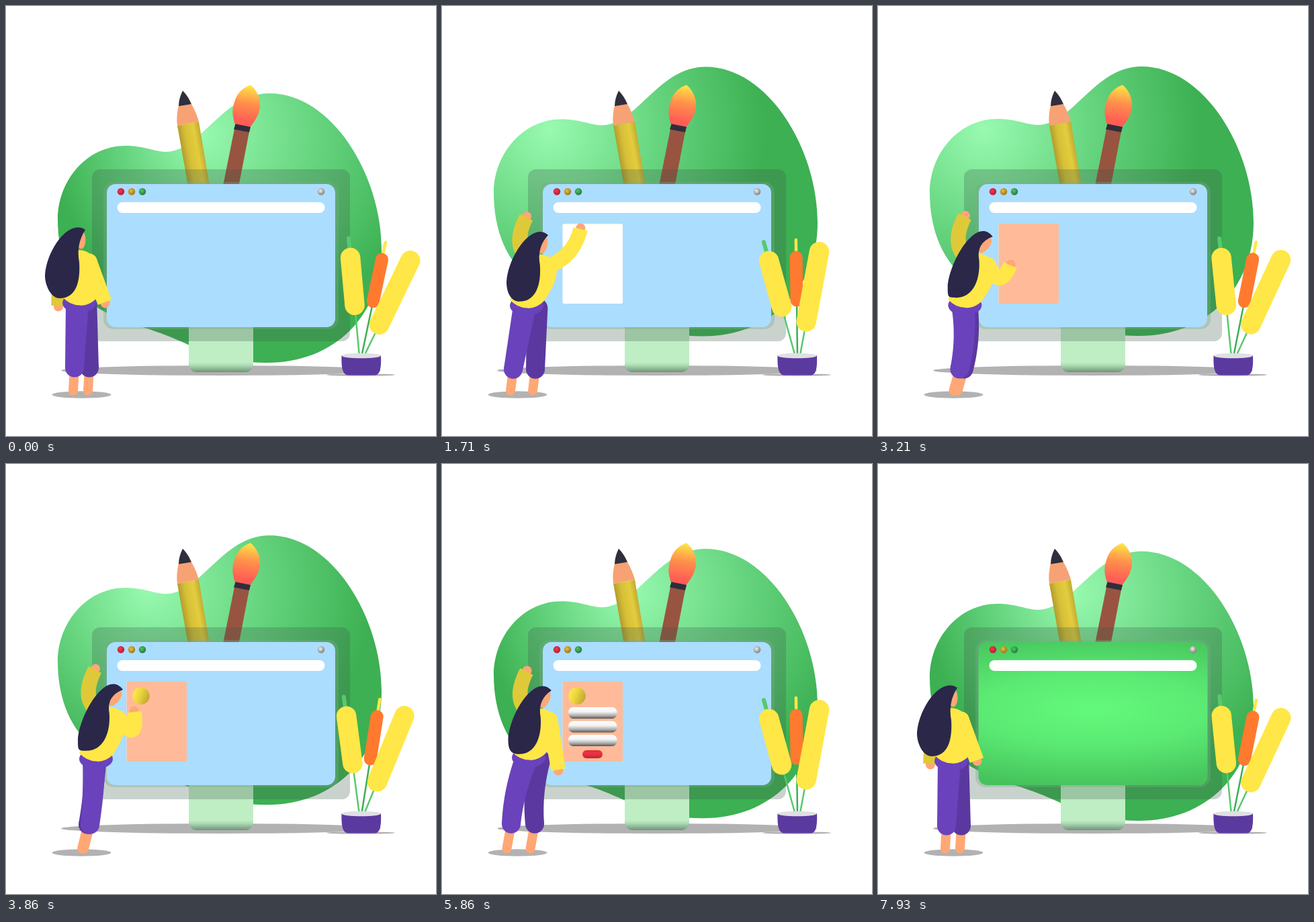
An HTML page with a canvas for the animation above (8 s loop, 640 by 640 pixels).

```html
<!DOCTYPE html>
<html lang="en">
<head>
<meta charset="utf-8">
<title>Building a page</title>
<style>
html, body { margin: 0; width: 100%; height: 100%; overflow: hidden; background: #fff; }
canvas { display: block; width: 100vw; height: 100vh; }
</style>
</head>
<body>
<canvas id="c" width="640" height="640"></canvas>
<script>
const g = document.getElementById('c').getContext('2d');
const LOOP = 8000;
const YELLOW = '#ffe747', SKIN = '#ffa775', DARK = '#2f2e3c', BLUE = '#abddff', SHADOW = '#b2b2b2';

// ---- helpers ----
const clamp = x => Math.min(1, Math.max(0, x));
const mix = (a, b, u) => Array.isArray(a) ? a.map((n, i) => mix(n, b[i], u)) : a + (b - a) * u;
const span = (t, a, b) => clamp((t - a) / (b - a));
const smooth = u => u * u * (3 - 2 * u);
const off = ([x, y], dx, dy) => [x + dx, y + dy];

// Steep ease with a long tail: bezier handles (.167, 0) and (.07, 1).
function glide(x) {
  let lo = 0, hi = 1, u = 0.5;
  for (let i = 0; i < 24; i++) {
    u = (lo + hi) / 2;
    const v = 1 - u;
    if (0.5 * u * v * v + 0.21 * u * u * v + u * u * u < x) lo = u; else hi = u;
  }
  return smooth(u);
}
function stops(gr, list) {
  list.forEach(([p, c]) => gr.addColorStop(p, c));
  return gr;
}
const linear = (x0, y0, x1, y1, ...s) => stops(g.createLinearGradient(x0, y0, x1, y1), s);
const radial = (x, y, r, ...s) => stops(g.createRadialGradient(x, y, 0, x, y, r), s);

function box(x, y, w, h, r, fill) {
  g.fillStyle = fill;
  g.beginPath();
  g.roundRect(x, y, w, h, r);
  g.fill();
}
function oval(x, y, rx, ry, fill, rot = 0) {
  g.fillStyle = fill;
  g.beginPath();
  g.ellipse(x, y, rx, ry, rot, 0, 7);
  g.fill();
}
const dot = (x, y, r, fill) => oval(x, y, r, r, fill);
function shape(d, fill) {
  g.fillStyle = fill;
  g.fill(new Path2D(d));
}
function line(x0, y0, x1, y1, w, color) {
  g.strokeStyle = color;
  g.lineWidth = w;
  g.lineCap = 'round';
  g.beginPath();
  g.moveTo(x0, y0);
  g.lineTo(x1, y1);
  g.stroke();
}
function pop(x, y, u, draw) {
  if (u <= 0) return;
  const k = smooth(u);
  g.save();
  g.translate(x, y);
  g.scale(k, k);
  g.translate(-x, -y);
  draw();
  g.restore();
}

// ---- backdrop ----
function blob(t) {
  const turn = 2880;
  const p = t < turn ? glide(t / turn) : 1 - glide((t - turn) / (LOOP - turn));
  const x = mix(288, 148, p), y = mix(192, 226, p), shift = 60 * (1 - p * p);
  g.save();
  g.translate(0, -43 * p);
  const light = g.createRadialGradient(x, y, 0, x + shift, y, 318 - 0.6 * shift);
  shape('M392 130C485 130 559 252 559 362C559 460 490 531 388 531C325 531 290 512 255 497' +
    'C213 478 175 473 138 450C96 424 77 372 77 318C77 260 120 208 178 208' +
    'C205 208 222 217 238 217C290 217 322 130 392 130Z',
    stops(light, [[0, '#98fab0'], [0.5, '#67d580'], [1, '#3cb052']]));
  g.restore();
}
function tools() {
  shape('M255 178L287 172L302.5 265H270.5Z',
    linear(261, 222, 294, 216, [0, '#ab962c'], [0.35, '#d6bf37'], [0.75, '#e3cd3d'], [1, '#c4ae34']));
  shape('M257 148Q253 164 255 178L287 172Q283 158 276 146Z', '#f7a274');
  shape('M263 126Q257 138 257 149L276 146Q271 134 263 126Z', DARK);
  shape('M340 183L362 187L347 265H323.5Z', '#985441');
  shape('M364 117.5C372 124 379 136 378 149C377 163 370 171 363 181L341 177C338 166 335 158 340 143C344 128 354 121 364 117.5Z',
    linear(362, 118, 352, 180, [0, '#ffe747'], [0.14, '#ffc948'], [0.42, '#ff914b'], [0.85, '#ff5f55'], [1, '#ff5a55']));
  shape('M341.5 175.5L364 180L362 188L339 183.5Z', DARK);
}
function stalk(x, deg, draw) {
  g.save();
  g.translate(x, 522);
  g.rotate(deg * Math.PI / 180);
  draw();
  g.restore();
}
function plant(t) {
  // Two even swings per loop, out and back.
  const swing = t < 3270 ? Math.abs(t - 2050) / (t < 2050 ? 2050 : 1220)
    : Math.abs(t - 6380) / (t < 6380 ? 3110 : 1620);
  const q = mix(-0.19, 1, swing);
  stalk(526, mix(-15.5, -5.2, q), () => {
    line(0, 0, 0, -100, 2.5, '#57c96d');
    line(0, -140, 0, -177, 6, '#57c96d');
    line(0, -77, 0, -148, 29.5, YELLOW);
  });
  stalk(529, mix(-0.8, 11.9, q), () => {
    line(0, 0, 0, -100, 2.5, '#3dae52');
    line(0, -140, 0, -174, 4.5, YELLOW);
    line(0, -84, 0, -148, 19, '#ff7a2f');
  });
  stalk(532.5, mix(10.4, 25.8, q), () => {
    line(0, 0, 0, -60, 2.5, '#57c96d');
    line(0, -53, 0, -159, 29.5, YELLOW);
  });
  oval(528, 549, 51, 1.7, SHADOW);
  shape('M499.5 520C499 535 500 549 509 549.5H549C558 549 558.5 535 558 520Z', '#5b3a9f');
  oval(528.7, 520.5, 29, 3.8, '#e0dfe4');
}

// ---- monitor ----
function monitor(green) {
  tools();
  box(128, 243, 384, 256, 12, 'rgba(60,90,70,.27)');
  box(145, 262, 350, 219, 15, 'rgba(120,170,140,.35)');
  box(150, 265, 340, 213, 13, BLUE);
  if (green > 0) {
    g.save();
    g.globalAlpha = green;
    g.beginPath();
    g.roundRect(149.5, 264.5, 341, 213.5, 13);
    g.clip();
    g.translate(320, 365);
    g.scale(3.2, 1);
    g.fillStyle = radial(0, 0, 118, [0, '#63fa7c'], [0.45, '#5bea73'], [1, '#45c25b']);
    g.fillRect(-120, -120, 240, 240);
    g.restore();
  }
  const knobs = { 171: ['#f03a50', '#b81c30'], 187: ['#eec03a', '#96771c'], 203: ['#50c868', '#237a38'], 469: ['#efefef', '#808080'] };
  for (const x in knobs) {
    const [a, b] = knobs[x];
    dot(+x, 276.3, 5.2, radial(x - 1, 275, 6.5, [0, a], [1, b]));
  }
  box(165.5, 292, 309, 16, 8, '#fff');
}
function page(t, green) {
  const shown = 1 - span(t, 7350, 7600);
  const card = (h, fill) => box(179.5, 324, 89.5, h, 2, fill);
  g.globalAlpha = shown;
  pop(224, 383, span(t, 850, 1300), () => card(119, '#fff'));
  const fill = span(t, 1710, 2657);
  if (fill > 0) card(119 * fill, '#ffbb99');
  g.globalAlpha = shown * green;
  card(119, '#d8edff');
  g.globalAlpha = shown;
  pop(201, 345, span(t, 3350, 3750), () =>
    dot(201, 345.3, 12.7, linear(190, 341, 213, 350, [0, '#ffe747'], [0.4, '#ecd43f'], [1, '#bfa62f'])));
  for (let i = 0; i < 3; i++) {
    const y = 362 + i * 20.5, at = 4350 + i * 250;
    pop(224, y + 8, span(t, at, at + 250), () =>
      box(188, y, 72.5, 17, 7.5, linear(0, y, 0, y + 17, [0, '#fff'], [0.4, '#f4f4f4'], [0.75, '#aaa'], [1, '#555'])));
  }
  pop(224, 432, span(t, 5100, 5350), () =>
    box(209, 426, 30, 12, 6, linear(0, 426, 0, 438, [0, '#e02c3d'], [0.4, '#ec3546'], [1, '#c02435'])));
  pop(378.5, 383.5, span(t, 6350, 6750), picture);
  g.globalAlpha = 1;
}
function picture() {
  box(299.5, 324, 157.5, 119, 2, linear(299, 0, 306, 0, [0, '#8fc5ec'], [1, BLUE]));
  ['#d8293f', '#c99f2a', '#38a751'].forEach((c, i) => dot(435.3 + i * 6.7, 333, 2.2, c));
  dot(384, 359.5, 12, YELLOW);
  shape('M363.5 355.5Q365 352.5 366.5 355.5L380 390L386.5 378.5Q388 376 389.5 378.5L403 411Q404 415 401 415H345Q341.5 415 343 411Z',
    linear(0, 354, 0, 415, [0, '#4cc163'], [1, '#5ad572']));
}

// ---- woman ----
// head: front tip of the hair; bow: bend of the near arm; lift: far arm raised;
// legs: x of the near and far ankle; knee: forward bend. The rest follows from these.
const stand = { head: [118, 333], hip: [110, 446], hand: [147, 441], legs: [102, 124], tilt: 0, bow: 0, lift: 0, knee: 0 };
const reach = { head: [158, 341], hip: [127, 450], hand: [206, 332], legs: [106, 139], tilt: 0.2, bow: 18, lift: 1, knee: 0 };
const bend = { ...reach, head: [162, 363], hip: [118, 467], hand: [213, 431], legs: [112, 143], tilt: 0.7, bow: 12, knee: 23 };
const place = { ...bend, head: [174, 336], hip: [135, 443], hand: [191, 369], legs: [125, 122], bow: 48, knee: 3 };
const rest = { ...reach, head: [163, 337], hip: [130, 441], hand: [173, 455], legs: [103, 138], tilt: 0.45, bow: 0, knee: -8 };
const press = { ...rest, hand: [190, 374], bow: 40 };

const ACTS = [[0, stand], [1300, reach], [1710, reach], [2657, bend], [3500, place],
  [3860, place], [4290, press], [5350, rest], [5860, rest], [6930, stand], [LOOP, stand]];

function poseAt(t) {
  const i = Math.max(1, ACTS.findIndex(a => t <= a[0]));
  const [t0, a] = ACTS[i - 1], [t1, b] = ACTS[i];
  const u = smooth(span(t, t0, t1)), pose = {};
  for (const k in a) pose[k] = mix(a[k], b[k], u);
  return pose;
}

// Tapered tube along a quadratic curve.
function limb(a, c, b, w0, w1, fill) {
  const one = [], two = [];
  for (let i = 0; i <= 16; i++) {
    const u = i / 16;
    const p = mix(a, c, u), q = mix(c, b, u), [x, y] = mix(p, q, u);
    const ang = Math.atan2(q[1] - p[1], q[0] - p[0]), r = mix(w0, w1, u) / 2;
    const nx = -Math.sin(ang) * r, ny = Math.cos(ang) * r;
    one.push([x + nx, y + ny]);
    two.unshift([x - nx, y - ny]);
  }
  g.fillStyle = fill;
  g.beginPath();
  one.concat(two).forEach(p => g.lineTo(...p));
  g.fill();
  dot(...a, w0 / 2, fill);
}
function arm(a, elbow, hand, fill) {
  const ang = Math.atan2(hand[1] - elbow[1], hand[0] - elbow[0]);
  dot(...off(hand, 1.5 * Math.cos(ang), 1.5 * Math.sin(ang)), 7, SKIN);
  limb(a, elbow, hand, 23, 21.5, fill);
}
function leg(hip, ankle, knee, w, fill) {
  limb(hip, off(mix(hip, ankle, 0.5), knee, 0), ankle, w, 28, fill);
  dot(...ankle, 14, fill);
}
function hair(tip, tilt) {
  const left = off(tip, -60 - 10 * tilt, 68 + 10 * tilt);
  const low = off(tip, -38 - 23 * tilt, 102 - 16 * tilt);
  const right = off(tip, -9 - 16 * tilt, 48 - 18 * tilt);
  oval(tip[0] - 6 - 8 * tilt, tip[1] + 15 - 3 * tilt, 6.5, 13.5, SKIN, tilt);
  g.fillStyle = '#2a2749';
  g.beginPath();
  g.moveTo(...tip);
  g.bezierCurveTo(...off(tip, -24, -17 - 22 * tilt), ...off(left, 2, -38), ...left);
  g.bezierCurveTo(...off(left, 0, 15), ...off(low, -13, 0), ...low);
  g.bezierCurveTo(...off(low, 24, 0), ...off(right, 2, 30), ...right);
  g.quadraticCurveTo(...off(right, -5, -26), ...tip);
  g.fill();
}
function shirt(neck, hip) {
  const side = off(neck, 23, 24);
  g.fillStyle = YELLOW;
  g.beginPath();
  g.moveTo(...off(neck, -12, 2));
  g.quadraticCurveTo(...off(neck, 18, -3), ...side);
  g.quadraticCurveTo(...off(side, 2, 18), ...off(hip, 24, -10));
  g.quadraticCurveTo(...off(hip, 12, 1), ...off(hip, 0, -0.5));
  g.quadraticCurveTo(...off(hip, -16, -1), ...off(hip, -26, -13));
  g.fill();
}
function woman(t) {
  const { head, hip, hand, legs, tilt, bow, lift, knee } = poseAt(t);
  const neck = off(head, -7 - 18 * tilt, 29 - 7 * tilt);
  oval(112.5, 578.5, 44, 5.2, SHADOW);
  arm(off(neck, -25, 0), off(neck, mix(-32, -40, lift), mix(49, -19, lift)),
    off(neck, mix(-33, -22, lift), mix(84, -54, lift)), '#dfc938');

  const ankles = legs.map(x => [x, 538 + 0.55 * (hip[1] - 445)]);
  ankles.forEach(a => line(...a, a[0] - 2 - 10 * tilt, 572.5, 14, SKIN));
  leg(off(hip, 0.45 * (legs[1] - legs[0]), 0), ankles[1], knee, 31, '#5b389f');
  oval(hip[0] - 1, hip[1] - 4, 25, 15, '#6a42bc');
  leg(off(hip, -4, -3), ankles[0], knee, 34, '#6a42bc');

  shirt(neck, hip);
  const shoulder = off(neck, 13, 18);
  const dx = hand[0] - shoulder[0], dy = hand[1] - shoulder[1], k = bow / Math.hypot(dx, dy);
  arm(shoulder, off(mix(shoulder, hand, 0.5), -dy * k, dx * k), hand, YELLOW);
  hair(head, tilt);
}

function draw(t) {
  const green = span(t, 6150, 6350);
  g.fillStyle = '#fff';
  g.fillRect(0, 0, 640, 640);
  blob(t);
  oval(320, 542.5, 238, 7.5, SHADOW);
  box(272, 440, 96, 105, [0, 0, 12, 12],
    linear(0, 530, 0, 545, [0, '#bfeec5'], [0.3, '#b0dcb6'], [1, '#6f9576']));
  monitor(green);
  page(t, green);
  plant(t);
  woman(t);
}

const start = performance.now();
function tick(now) {
  draw(Math.max(0, now - start) % LOOP);
  requestAnimationFrame(tick);
}
draw(0);
requestAnimationFrame(tick);
</script>
</body>
</html>
```
